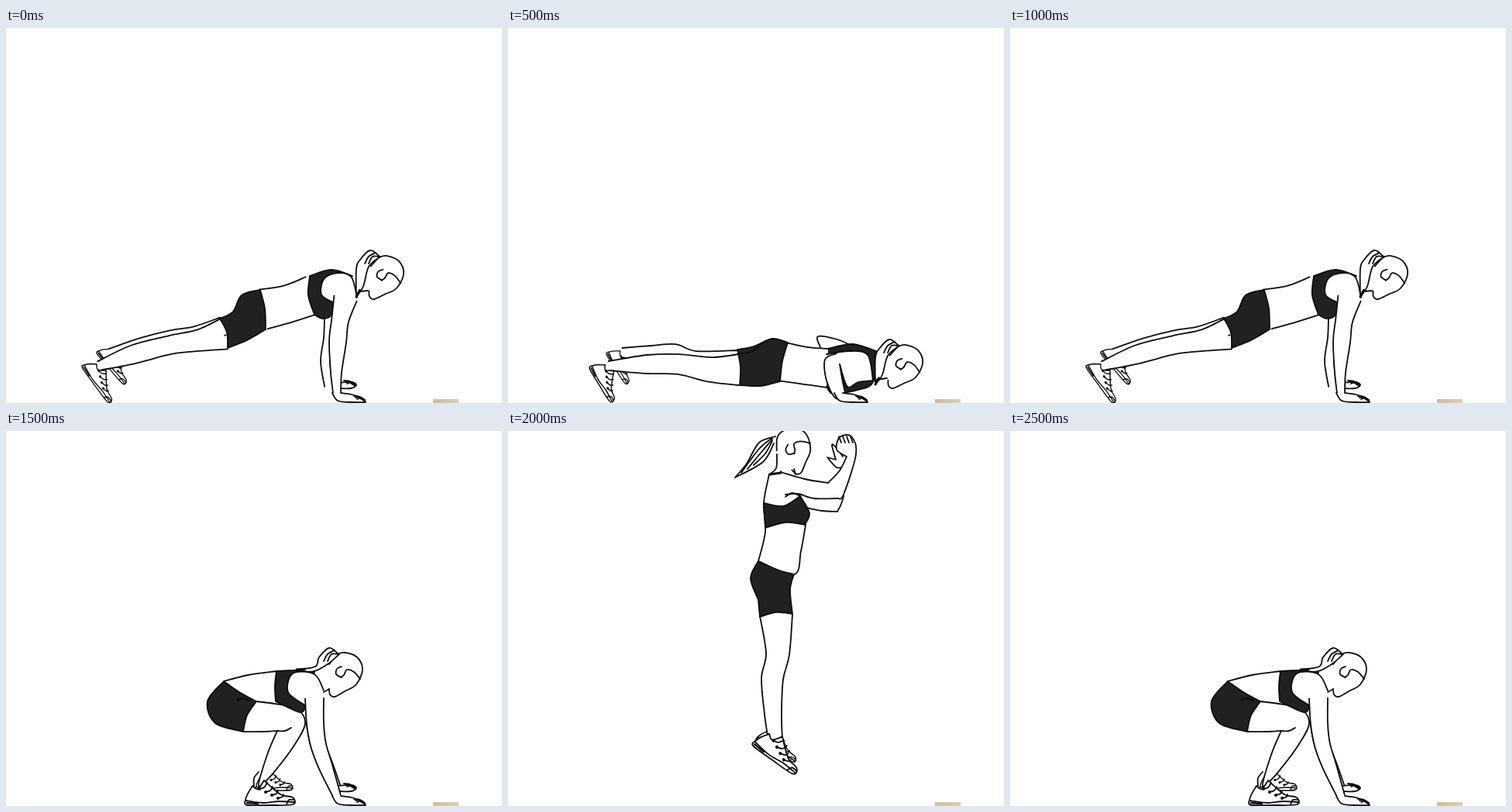
An HTML page with a canvas that plays this animation: 640 px wide and 484 px high, repeating every 3000 ms.

```html
<!DOCTYPE html>
<html lang="en">
<head>
<meta charset="utf-8">
<title>Burpee</title>
<style>
html, body { margin: 0; width: 100%; height: 100%; overflow: hidden; background: #fff; }
canvas { display: block; }
</style>
</head>
<body>
<canvas id="stage" width="640" height="484"></canvas>
<script>
const ctx = document.getElementById('stage').getContext('2d');
const INK = '#0c0c0c', CLOTH = '#212121', PAPER = '#fff';
const STEP = 500;

const points = text => text.trim().split(/\s+/).map(p => p.split(',').map(Number));

// Smooth curve through the points, continuing an existing path.
function spline(path, pts) {
  for (let i = 0; i < pts.length - 1; i++) {
    const b = pts[i], c = pts[i + 1];
    const a = pts[i - 1] || b, d = pts[i + 2] || c;
    path.bezierCurveTo(
      b[0] + (c[0] - a[0]) / 6, b[1] + (c[1] - a[1]) / 6,
      c[0] - (d[0] - b[0]) / 6, c[1] - (d[1] - b[1]) / 6, ...c);
  }
}

function paint(path, fill, width = 1.8) {
  if (fill) {
    ctx.fillStyle = fill;
    ctx.fill(path);
  }
  ctx.lineWidth = width;
  ctx.stroke(path);
}

// "/" makes a corner at the point before it.
function shape(text, fill, width) {
  const path = new Path2D();
  let last;
  for (const run of text.split('/').map(points)) {
    if (last) run.unshift(last);
    else path.moveTo(...run[0]);
    spline(path, run);
    last = run.at(-1);
  }
  paint(path, fill, width);
}
const skin = text => shape(text, PAPER);
const cloth = text => shape(text, CLOTH);
const line = (text, width) => shape(text, null, width);

// A tapered tube through joints "x,y,radius", open at both ends.
function limb(text) {
  const joints = points(text);
  const side = sign => joints.map(([x, y, r], i) => {
    const a = joints[i - 1] || joints[i], b = joints[i + 1] || joints[i];
    const dir = Math.atan2(b[1] - a[1], b[0] - a[0]);
    return [x - sign * r * Math.sin(dir), y + sign * r * Math.cos(dir)];
  });
  const left = side(1), right = side(-1).reverse();
  const body = new Path2D(), edges = new Path2D();
  body.moveTo(...left[0]);
  spline(body, left);
  body.lineTo(...right[0]);
  spline(body, right);
  ctx.fillStyle = PAPER;
  ctx.fill(body);
  for (const edge of [left, right]) {
    edges.moveTo(...edge[0]);
    spline(edges, edge);
  }
  paint(edges);
}

function place(x, y, degrees, sx, sy, draw) {
  ctx.save();
  ctx.translate(x, y);
  ctx.rotate(degrees * Math.PI / 180);
  ctx.scale(sx, sy);
  draw();
  ctx.restore();
}

// Heel at the given point, sole running towards the toe.
function shoe(x, y, degrees, sx, sy) {
  place(x, y, degrees, sx, sy, () => {
    skin('0,-3 3,-13 10,-25 / 17,-21 25,-32 / 36,-22 48,-13 62,-10 62,-1 30,0 4,0 0,-3');
    line('1,-6 24,-3 44,-5 64,-4');
    line('3,-3 17,-2', 2.4);
    line('54,-1 57,-7 64,-7');
    for (let i = 0; i < 4; i++) {
      const lx = 19 + 8 * i, ly = 4 * i - 21;
      line(`${lx},${ly} ${lx + 6},${ly - 2} ${lx + 10 - i},${ly - 8 + i}`);
      ctx.fillStyle = INK;
      ctx.beginPath();
      ctx.arc(lx, ly, 2, 0, 7);
      ctx.fill();
    }
  });
}

function head(x, y, degrees) {
  place(x, y, degrees, 1, 1, () => {
    skin('-20,-9 -10,-21 0,-24 16,-18 23,-2 15,17 0,26 -13,33 -19,30 -20,23');
    line('20,10 12,1 3,-2 -1,5 -5,8');
    line('-4,8 -11,4 -10,-3 -4,-6');
  });
}

// Tied at the back of the head and falling to a pointed tip.
function ponytail(x, y, tipX, tipY) {
  const mx = tipX / 2 - 10, my = tipY / 2 + 1;
  place(x, y, 0, 1, 1, () => {
    skin(`-8,-23 -20,-31 -33,-19 -38,-7 ${tipX},${tipY} / ${mx},${my} -22,-10 -7,-23`);
    for (const gap of [0, 5]) line(`${gap - 27},-14 ${gap - 22},-23 ${gap - 13},${gap - 28}`);
    line(`${tipX},${tipY} ${(tipX + mx) / 2},${(tipY + my) / 2 - 2}`, 3);
  });
}

function fingers(x, y) {
  for (let i = 0; i < 3; i++) line(`${x - 14 + 2 * i},${y - 5 + 2 * i} ${x - 6},${y - 4 + i} ${x},${y + i}`);
}

function farHand() {
  skin('428,458 446,457 452,461 445,465 430,465');
  fingers(450, 460);
}

function nearHand() {
  skin('421,471 428,481 445,483 464,483 / 460,478 446,473 432,471');
  fingers(463, 480);
}

function plank() {
  shoe(116, 419, 50, 0.85, 0.7);
  limb('134,420,6 175,412,12 214,401,11 245,396,11 280,385,12');
  limb('120,436,6 165,421,12 212,409,12 250,403,14 281,395,20');
  shoe(97, 437, 54, 0.92, 0.72);

  limb('417,372,6 417,400,7 412,430,6 417,462,6');
  farHand();
  limb('332,363,26 364,356,24 395,345,25');
  cloth('276,375 293,366 304,345 328,338 / 334,362 335,389 / 311,403 286,413 / 285,393 276,375');
  cloth('392,320 420,312 447,320 / 423,350 / 421,369 409,375 398,370 / 390,345 392,320');

  skin('424,355 407,344 411,323 430,316 446,322 453,348');
  limb('438,349,15 431,378,11 428,405,11 426,445,7 427,471,5');
  nearHand();
  ponytail(490, 318, -38, 29);
  head(490, 318, 4);
  line('457,340 467,339');
}

function pushUp() {
  shoe(126, 420, 58, 0.74, 0.7);
  limb('147,419,6 185,421,11 215,419,11 242,428,11 297,427,11');
  limb('130,436,6 180,434,12 220,434,13 262,441,16 298,441,20');
  shoe(104, 438, 59, 0.83, 0.8);

  skin('403,412 400,398 425,402 443,410');
  limb('356,431,25 385,436,24 413,439,25');
  cloth('296,415 317,411 341,401 361,406 / 354,430 351,456 / 326,462 299,461 / 300,438 296,415');
  line('297,420 314,418 329,406');
  cloth('413,414 445,408 477,418 / 471,457 452,467 432,471 / 418,472 411,463');

  skin('411,421 440,417 464,422 471,455 / 452,457 438,463 428,434');
  skin('428,434 431,452 435,471 / 423,478 411,455 409,428 424,420');
  nearHand();
  ponytail(512, 433, -38, 27);
  head(512, 433, 4);
  line('475,454 489,452');
}

function squat() {
  shoe(322, 464, 0, 0.74, 0.8);
  limb('392,375,5 402,405,9 413,432,9 427,460,5');
  farHand();
  skin('281,323 312,315 349,310 / 384,361 323,349');
  skin('323,349 371,357 386,377 369,410 343,444 / 326,458 337,418 350,387 / 335,388 306,388');
  line('350,387 360,387 368,383');
  cloth('281,323 260,349 270,377 306,388 / 311,367 323,349 / 301,337 281,323');
  line('299,347 306,345 314,348', 2.4);
  line('326,440 320,448 320,458');
  shoe(308, 483, 0, 1, 1);

  cloth('349,310 372,309 398,311 / 386,356 / 379,363 348,349 / 347,329 349,310');
  skin('386,354 364,337 370,313 398,314 410,335');
  limb('398,345,12 399,378,11 403,405,10 412,432,9 427,471,5');
  nearHand();
  head(437, 310, 0);
  ponytail(437, 311, -62, -3);
  line('410,337 417,333');
}

function jump() {
  shoe(319, 399, 31, 0.9, 0.8);
  skin('386,85 426,87 / 433,82 430,94 425,104 / 405,103 385,99');
  skin('434,46 424,47 412,34 / 423,37 / 418,18 424,22 432,33');

  limb('346,238,21 348,288,15 341,320,14 342,365,11 345,399,9');
  skin('337,56 330,93 332,130 323,168 / 369,185 378,155 384,121 / 377,84 352,52');
  cloth('323,168 313,190 323,218 / 325,240 / 345,234 367,236 / 364,205 369,185 / 347,179 323,168');
  cloth('330,93 332,125 / 358,118 383,121 / 389,106 377,84 / 355,97 330,93');
  skin('352,53 383,62 413,67 / 428,51 437,33 / 424,24 428,8 443,7 449,30 433,82 426,87 / 395,87 374,81 358,82');
  for (let x = 427; x < 444; x += 5) line(`${x},7 ${x + 3},15`);
  line('358,85 367,80 377,84');
  shoe(314, 405, 36, 1.05, 1);

  head(368, 20, -38);
  line('347,30 346,48 337,56');
  line('369,49 371,56');
  line('338,56 352,54', 3);
  skin('345,7 324,15 308,42 293,60 / 329,40 343,16');
  for (let i = 0; i < 3; i++) line(`${341},${9 + 2 * i} ${324 + 4 * i},${23 + 3 * i} ${301 + 8 * i},${54 - 5 * i}`);
}

function cornerBlock() {
  const tan = ctx.createLinearGradient(551, 0, 584, 0);
  tan.addColorStop(0, '#cdbd9d');
  tan.addColorStop(1, '#dccfb6');
  ctx.fillStyle = tan;
  ctx.fillRect(551, 479, 33, 5);
}

const poses = [plank, pushUp, plank, squat, jump, squat];
const start = performance.now();

function draw(now) {
  const step = Math.floor(Math.max(0, now - start) / STEP) % poses.length;
  ctx.fillStyle = PAPER;
  ctx.fillRect(0, 0, 640, 484);
  ctx.strokeStyle = INK;
  ctx.lineCap = ctx.lineJoin = 'round';
  cornerBlock();
  poses[step]();
  requestAnimationFrame(draw);
}
draw(start);
</script>
</body>
</html>
```
